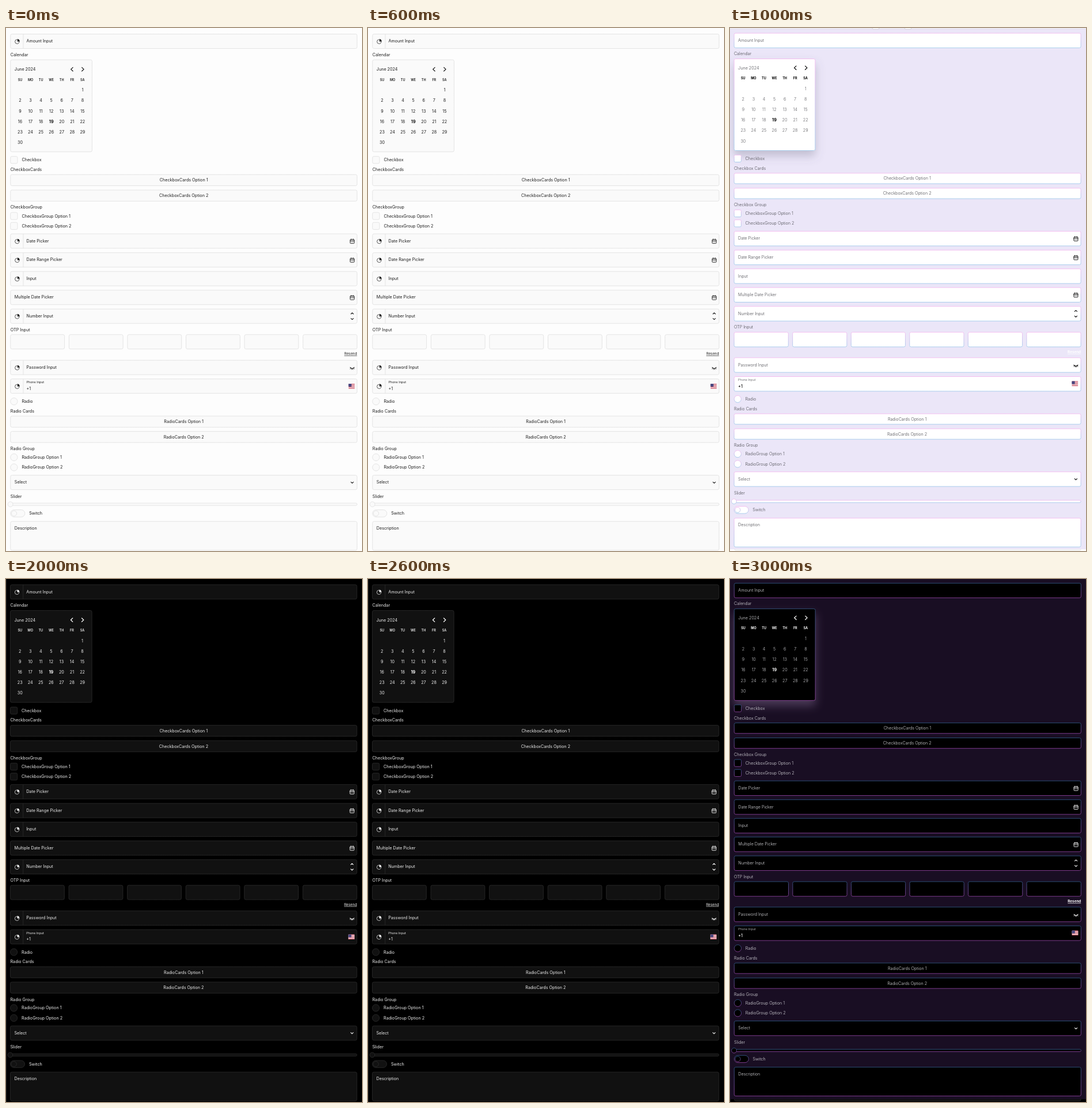
Write an HTML page that moves like this. It is 618 px wide and 907 px high and loops after 4 s.

```html
<!DOCTYPE html>
<html lang="en">
<head>
<meta charset="utf-8">
<title>Form themes</title>
<style>
html, body { margin: 0; width: 100%; height: 100%; overflow: hidden; background: #fdfdfd; }
svg { position: absolute; left: 0; top: 0; width: 618px; height: 907px; visibility: hidden; }
text { font-family: Inter, "Liberation Sans", sans-serif; white-space: pre; }
</style>
</head>
<body>
<script>
// Vertical positions: box tops, label centres and option centres.
const PLAIN = {
  x: 7.8, w: 601.6, right: 601, fieldH: 25, cardH: 19.3, calH: 159.5, calW: 141.6, firstDay: 24.5,
  amount: 10.5, calendar: 46, cal: 55.2, check: 228.8, cardsLabel: 245.4, cards: [254.2, 281],
  groupLabel: 310.9, group: [326, 343.3], fields: [357, 389.7, 422.2, 454.7, 487.3],
  otpLabel: 523.3, otp: 531.7, resend: 565, password: 576.2, phone: 608.6,
  radio: 647.6, radioLabel: 664, radioCards: [673, 699.6], radiosLabel: 729.8, radios: [744.5, 761.9],
  select: 775.6, sliderLabel: 812.4, slider: 826, toggle: 841.8, area: 855.7
};
const GLOW = {
  x: 7.1, w: 602, right: 600.4, fieldH: 25.4, cardH: 18.2, calH: 159, calW: 140.8, firstDay: 22.8,
  amount: 9, calendar: 44.2, cal: 53.5, check: 226.4, cardsLabel: 243.2, cards: [251.8, 277.8],
  groupLabel: 306.7, group: [321.5, 338.8], fields: [352.5, 385.2, 417.7, 450.1, 482.8],
  otpLabel: 518.7, otp: 527.6, resend: 561.8, password: 571.8, phone: 604.5,
  radio: 643.4, radioLabel: 660.2, radioCards: [669, 695], radiosLabel: 723.8, radios: [738.6, 756],
  select: 769.7, sliderLabel: 806.4, slider: 821, toggle: 835.8, area: 850
};

const THEMES = [
  { id: 'light', at: PLAIN, bg: '#fdfdfd', fill: '#fafafa', line: ['#dedede', '#dedede'],
    ink: '#1c1c1c', day: '#1c1c1c', icon: '#111', link: '#222', h: 907 },
  { id: 'pastel', at: GLOW, glow: true, bg: '#ebe6f8', fill: '#fff', line: ['#f3bff0', '#a9cdec'],
    ink: '#4a4a50', day: '#5a5a5e', icon: '#000', link: '#fff', h: 904,
    blobs: [['#fde3f8', 110, 130, 330, 420, 1], ['#d3e7f9', 610, 60, 330, 400, 1],
            ['#dce9fb', 20, 730, 300, 330, .9], ['#fce2f8', 610, 740, 330, 310, 1]],
    shadow: '#606078', shade: .3 },
  { id: 'dark', at: PLAIN, dx: -.3, dy: -.6, bg: '#000', fill: '#111', line: ['#2b2b2b', '#2b2b2b'],
    ink: '#eee', day: '#eee', icon: '#fff', link: '#eee', h: 907 },
  { id: 'neon', at: GLOW, glow: true, dx: .2, dy: -1.7, k: .998, bg: '#190e23', fill: '#000',
    line: ['#2b4c74', '#7d3a8c'], ink: '#dcdce0', day: '#d0d0d4', icon: '#fff', link: '#fff', h: 902,
    blobs: [['#34123b', 90, 130, 300, 420, 1], ['#0e0a18', 440, 120, 260, 330, .9],
            ['#100a1a', 60, 740, 280, 280, .9], ['#3c1545', 618, 790, 300, 300, 1]],
    shadow: '#a88cb8', shade: .35 }
];

function scene(t) {
  const p = t.at, g = t.glow, dx = t.dx || 0, out = [];
  const Y = y => y * (t.k || 1) + (t.dy || 0);
  const X = x => x + dx;
  const add = s => out.push(s);
  const stroke = `url(#${t.id}-line)`;
  const left = X(p.x), width = p.w, end = left + width, ix = X(p.right);

  const text = (s, x, y, o = {}) => {
    const size = o.size || 7.2;
    add(`<text x="${x}" y="${y + size * .36}" font-size="${size}" fill="${o.fill || t.ink}"` +
      ` font-weight="${o.weight || (g ? 300 : 400)}" text-anchor="${o.anchor || 'start'}"` +
      `${o.under ? ' text-decoration="underline"' : ''}>${s}</text>`);
  };
  const box = (x, y, w, h, r = 2.6, extra = '') =>
    add(`<rect x="${x}" y="${y}" width="${w}" height="${h}" rx="${r}" fill="${t.fill}"` +
      ` stroke="${stroke}" stroke-width="${g ? 1 : .8}" ${extra}/>`);
  const path = (d, w = 1, fill = 'none') =>
    add(`<path d="${d}" fill="${fill}" stroke="${t.icon}" stroke-width="${w}"` +
      ` stroke-linecap="round" stroke-linejoin="round"/>`);
  const label = (s, y) => text(s, left - (g ? .2 : 0), Y(y));

  const pie = (x, y) => {
    path(`M${x - .5} ${y - 3.4}A3.7 3.7 0 1 0 ${x + 3.4} ${y + .6}`, .7);
    path(`M${x + .5} ${y - .4}V${y - 3.8}A3.5 3.5 0 0 1 ${x + 3.8} ${y - .4}Z`, .6, t.icon);
  };
  const calIcon = y => {
    add(`<rect x="${ix - 3.6}" y="${y - 3}" width="7.2" height="6.8" rx="1" fill="none" stroke="${t.icon}" stroke-width=".85"/>`);
    path(`M${ix - 3.6} ${y - .7}h7.2M${ix - 1.8} ${y - 4}v1.6M${ix + 1.8} ${y - 4}v1.6`, .85);
    path(`M${ix - 1.9} ${y + 1.2}h.1M${ix} ${y + 1.2}h.1M${ix + 1.9} ${y + 1.2}h.1`, .8);
  };
  const chevron = (x, y, dir) => path(`M${x - 2.1} ${y - dir}l2.1 ${dir * 2}l2.1 ${-dir * 2}`, 1.1);
  const eye = y => {
    path(`M${ix - 3.5} ${y - 1.2}q3.5 3.6 7 0`, 1.1);
    path(`M${ix - 2.6} ${y + .2}l-.9 1.2M${ix - .8} ${y + .9}l-.3 1.5M${ix + .8} ${y + .9}l.3 1.5M${ix + 2.6} ${y + .2}l.9 1.2`, .8);
  };
  const flag = y => {
    const x = ix - (g ? 7 : 6.4), h = 8.4 / 7;
    add(`<rect x="${x}" y="${y}" width="10.8" height="8.4" rx="1" fill="#f0e8ea"/>`);
    for (let i = 0; i < 7; i += 2)
      add(`<rect x="${x}" y="${y + i * h}" width="10.8" height="${h}" rx=".4" fill="#d0566a"/>`);
    add(`<rect x="${x}" y="${y}" width="5.2" height="${h * 4}" rx=".6" fill="#46467f"/>`);
  };

  const field = (s, y, prefix = true) => {
    const top = Y(y), mid = top + p.fieldH / 2;
    box(left, top, width, p.fieldH);
    let x = left + 7;
    if (prefix && !g) {
      add(`<path d="M${X(30)} ${top}v${p.fieldH}" stroke="${stroke.replace('line', 'rule')}" stroke-width=".8"/>`);
      pie(X(19.6), mid + .3);
      x = X(35.5);
    }
    if (s) text(s, x, mid - .4);
    return { mid, x };
  };
  const card = (s, y) => {
    box(left, Y(y), width, p.cardH);
    text(s, X(g ? 307.6 : 308.7), Y(y) + p.cardH / 2, { anchor: 'middle' });
  };
  const option = (s, y, round) => {
    const c = Y(y), x = X(g ? 13.3 : 13.9), r = 6.1;
    box(x - r, c - r, r * 2, r * 2, round ? r : 2.2);
    text(s, X(g ? 26.6 : 27.4), c);
  };

  function calendar() {
    const top = Y(p.cal), titleY = top + (g ? 15.6 : 16.4), step = 18.06, x0 = X(p.firstDay);
    box(left, top, p.calW, p.calH, 2.6, g ? `filter="url(#${t.id}-shadow)"` : '');
    text('June 2024', left + 7, titleY);
    [[113.2, -1], [132.2, 1]].forEach(([x, d]) => {
      const cx = X(x + (g ? 0 : 1.2));
      path(`M${cx - d * 1.7} ${titleY - 3.2}l${d * 3.4} 3.2l${-d * 3.4} 3.2`, 1.2);
    });
    ['SU', 'MO', 'TU', 'WE', 'TH', 'FR', 'SA'].forEach((d, i) =>
      text(d, x0 + i * step, titleY + 18, { size: 5.5, weight: g ? 700 : 600, anchor: 'middle', fill: g ? t.icon : t.ink }));
    for (let n = 1; n <= 30; n++) {
      const cell = n + 5, now = n === 19;
      text(n, x0 + cell % 7 * step, titleY + 36.1 + Math.floor(cell / 7) * 18.15,
        { size: 7.2, anchor: 'middle', weight: now ? 700 : 0, fill: now ? t.icon : t.day });
    }
  }

  function defs() {
    const [a, b] = t.line;
    add(`<defs><linearGradient id="${t.id}-line" x2="0" y2="1"><stop stop-color="${a}"/><stop offset="1" stop-color="${b}"/></linearGradient>` +
      `<linearGradient id="${t.id}-rule" gradientUnits="userSpaceOnUse" x2="0" y2="907"><stop stop-color="${a}"/><stop offset="1" stop-color="${b}"/></linearGradient>` +
      (g ? `<filter id="${t.id}-shadow" x="-30%" y="-30%" width="160%" height="170%"><feDropShadow dx="0" dy="9" stdDeviation="8" flood-color="${t.shadow}" flood-opacity="${t.shade}"/></filter>` : '') +
      (t.blobs || []).map(([c, x, y, rx, ry, o], i) =>
        `<radialGradient id="${t.id}-${i}" gradientUnits="userSpaceOnUse" r="1" gradientTransform="translate(${x} ${y}) scale(${rx} ${ry})">` +
        `<stop stop-color="${c}" stop-opacity="${o}"/><stop offset=".35" stop-color="${c}" stop-opacity="${o * .75}"/>` +
        `<stop offset="1" stop-color="${c}" stop-opacity="0"/></radialGradient>`).join('') + '</defs>');
  }

  function backdrop() {
    const fill = c => add(`<rect width="618" height="${t.h}" fill="${c}"/>`);
    fill(t.bg);
    (t.blobs || []).forEach((_, i) => fill(`url(#${t.id}-${i})`));
    if (t.id === 'pastel') {
      add('<path d="M0 .5h618" stroke="#f8f7fa"/><path d="M0 1.4h618" stroke="#d9d5e2" stroke-width=".6"/>');
      add('<path d="M247 0q0 2 2 2h8q2 0 2-2M303 0q0 2 2 2h8q2 0 2-2" fill="#fff" stroke="#c4c1cc" stroke-width=".7"/>');
    }
    if (t.id === 'dark') add('<rect width=".6" height="907" fill="#333"/>');
  }

  defs();
  backdrop();
  field('Amount Input', p.amount);
  label('Calendar', p.calendar);
  calendar();
  option('Checkbox', p.check);
  const gap = g ? ' ' : '';
  label(`Checkbox${gap}Cards`, p.cardsLabel);
  p.cards.forEach((y, i) => card(`CheckboxCards Option ${i + 1}`, y));
  label(`Checkbox${gap}Group`, p.groupLabel);
  p.group.forEach((y, i) => option(`CheckboxGroup Option ${i + 1}`, y));

  ['Date Picker', 'Date Range Picker', 'Input', 'Multiple Date Picker', 'Number Input'].forEach((s, i) => {
    const { mid } = field(s, p.fields[i], i !== 3);
    if (s.includes('Date')) calIcon(mid + .3);
    if (i === 4) { chevron(ix, mid - 4.8, -1); chevron(ix, mid + 4.8, 1); }
  });

  label('OTP Input', p.otpLabel);
  for (let i = 0; i < 6; i++) box(left + i * 101.56, Y(p.otp), width - 5 * 101.56, p.fieldH);
  text('Resend', end, Y(p.resend), { size: 6.3, anchor: 'end', under: true, fill: t.link, weight: g ? 700 : 400 });

  eye(field('Password Input', p.password).mid + 1.2);
  const phone = field('', p.phone);
  text('Phone Input', phone.x, phone.mid - 6.8, { size: 5.4 });
  text('+1', phone.x, phone.mid + 4.2, { weight: g ? 500 : 400, fill: g ? t.icon : t.ink });
  flag(phone.mid - (g ? 4.6 : 4));

  option('Radio', p.radio, true);
  label('Radio Cards', p.radioLabel);
  p.radioCards.forEach((y, i) => card(`RadioCards Option ${i + 1}`, y));
  label('Radio Group', p.radiosLabel);
  p.radios.forEach((y, i) => option(`RadioGroup Option ${i + 1}`, y, true));
  chevron(ix, field('Select', p.select, false).mid + .2, 1);

  label('Slider', p.sliderLabel);
  const sy = Y(p.slider);
  box(left, sy - 2, width, 4, 2);
  box(left - 4.6, sy - 4.4, 8.8, 8.8, 4.4);

  const ty = Y(p.toggle);
  box(left, ty - 6.2, 25, 12.4, 6.2);
  box(left + 1.6, ty - 4.6, 9.2, 9.2, 4.6);
  text('Switch', X(g ? 39.2 : 40.2), ty);

  box(left, Y(p.area), width, 50);
  text('Description', left + 7, Y(p.area) + 11.4);

  const svg = document.createElementNS('http://www.w3.org/2000/svg', 'svg');
  svg.setAttribute('viewBox', '0 0 618 907');
  svg.style.clipPath = `inset(0 0 ${907 - t.h}px 0)`;
  svg.innerHTML = out.join('');
  document.body.append(svg);
  return svg;
}

const scenes = THEMES.map(scene);

// Each glowing theme lies over the plain one before it.
function show(now) {
  const step = Math.floor(now % 4000 / 1000);
  scenes.forEach((s, i) => {
    const on = i === step || (i % 2 === 0 && i === step - 1);
    s.style.visibility = on ? 'visible' : 'hidden';
  });
}
let start;
function tick(now) {
  start ??= now;
  show(now - start);
  requestAnimationFrame(tick);
}
show(0);
requestAnimationFrame(tick);
</script>
</body>
</html>
```
